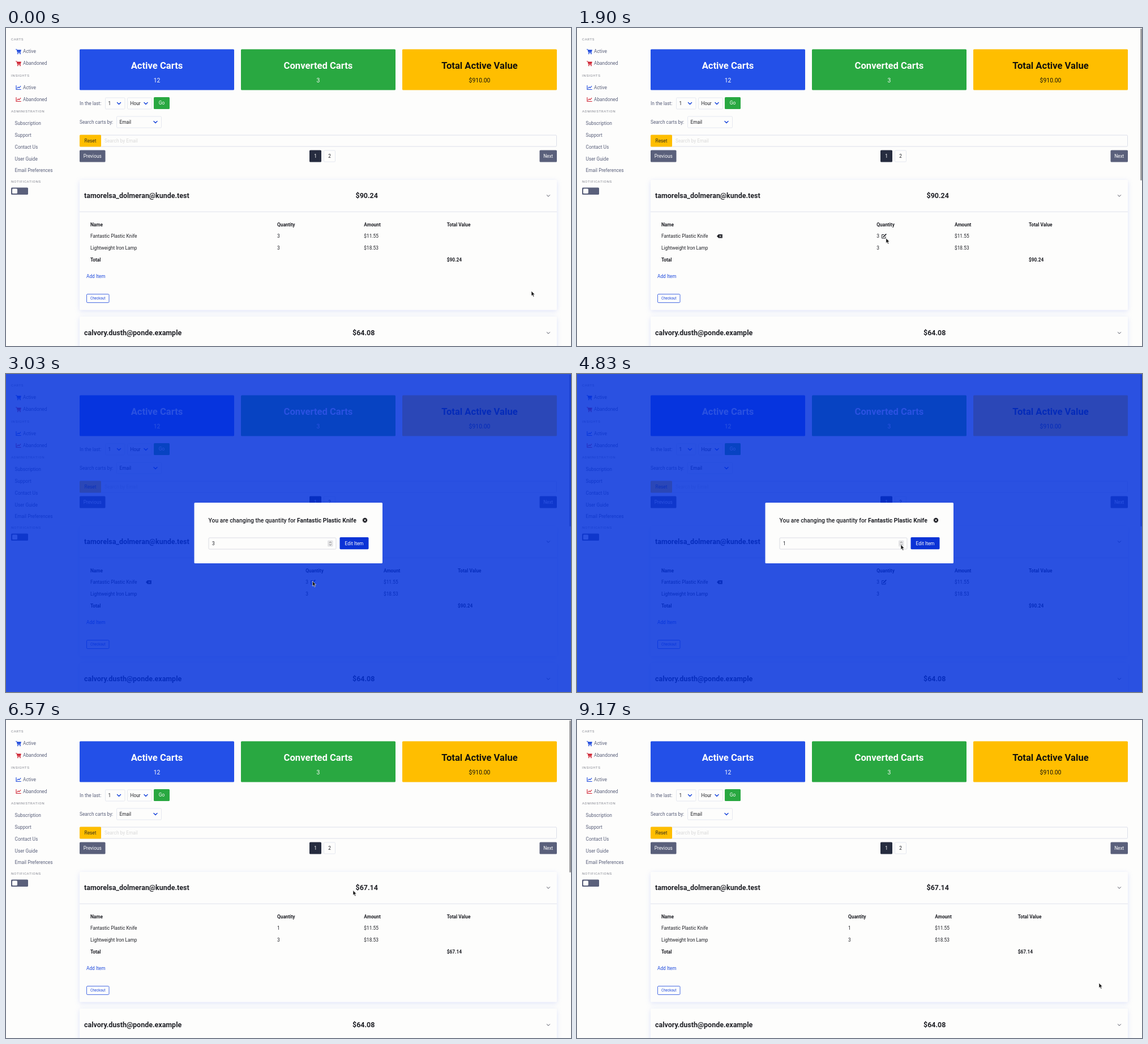
An HTML page for the animation above (9.24 s loop, 998 by 561 pixels).

```html
<!DOCTYPE html>
<html lang="en">
<head>
<meta charset="utf-8">
<title>Carts</title>
<style>
  html, body { margin: 0; width: 100%; height: 100%; overflow: hidden; background: #fdfdfc; }
  svg { display: block; width: 998px; height: 561px; font-family: Roboto, sans-serif; }
  text { white-space: pre; }
  .panel { filter: drop-shadow(0 2px 4px rgba(70, 100, 235, .17)); }
</style>
</head>
<body>
<svg id="stage" viewBox="0 0 998 561"></svg>
<script>
const LOOP = 9240, OPEN = 3030, CLOSE = 6570;
const INK = '#1f2026', SLATE = '#5a607b', BLUE = '#1d49dc', RED = '#cf2433', WHITE = '#fdfdfc';
const PAGE = '#fdfdfc', GREEN = '#29a841', GOLD = '#ffbe00', LINE = '#dfe2ec';

// x, vertical centre of the capitals, text, and options
const text = (x, y, s, { size = 8.32, fill = INK, w = 400, mid, id, gap = 0 } = {}) =>
  `<text x="${x}" y="${(y + size * .355).toFixed(2)}" font-size="${size}" fill="${fill}" font-weight="${w}"` +
  `${mid ? ' text-anchor="middle"' : ''}${id ? ` id="${id}"` : ''}${gap ? ` letter-spacing="${gap}"` : ''}>${s}</text>`;
const box = (x, y, w, h, fill, extra = '') =>
  `<rect x="${x}" y="${y}" width="${w}" height="${h}" rx="1.6" fill="${fill}" ${extra}/>`;
const stroke = (d, color, w = 1) =>
  `<path d="${d}" fill="none" stroke="${color}" stroke-width="${w}" stroke-linecap="round" stroke-linejoin="round"/>`;
const outline = (x, y, w, h, color = LINE) => box(x + .5, y + .5, w - 1, h - 1, PAGE, `stroke="${color}" stroke-width=".8"`);
const button = (x, y, w, h, fill, label, color = WHITE, size = 8.32) =>
  box(x, y, w, h, fill) + text(x + w / 2, y + h / 2, label, { fill: color, mid: true, size });
const chevron = (x, y, r, color, w) => stroke(`M${x - r} ${y - r / 2}l${r} ${r} ${r} ${-r}`, color, w);
const select = (x, y, w, label) =>
  outline(x, y, w, 21) + text(x + 5.5, y + 10.5, label) + chevron(x + w - 11, y + 10.5, 3, BLUE, 1.5);

const cart = (y, c) => `<g transform="translate(17 ${y - 4.5})">` + stroke('M.5 .8h1.6l1.4 5.7h5', c, 1) +
  `<path d="M2.5 1.5h7.4l-1.1 3.9h-5.4z" fill="${c}"/><circle cx="3.9" cy="8.3" r="1" fill="${c}"/><circle cx="8" cy="8.3" r="1" fill="${c}"/></g>`;
const chart = (y, c) => `<g transform="translate(17.5 ${y - 4})">` + stroke('M.5 .5v7h8.3', c, 1.1) +
  stroke('M2.2 5.2l2-2 1.5 1.4 2.6-3', c, 1.1) + '</g>';

function sidebar() {
  const heads = [[20, 'CARTS'], [84, 'INSIGHTS'], [147, 'ADMINISTRATION'], [271, 'NOTIFICATIONS']];
  const links = [[168.5, 'Subscription'], [189.5, 'Support'], [210, 'Contact Us'], [231, 'User Guide'], [251, 'Email Preferences']];
  const marked = [[41.5, cart, BLUE, 'Active'], [62.5, cart, RED, 'Abandoned'], [105, chart, BLUE, 'Active'], [126, chart, RED, 'Abandoned']];
  return heads.map(([y, s]) => text(9, y, s, { size: 6.24, fill: '#858791', gap: .62 })).join('') +
    marked.map(([y, icon, c, s]) => icon(y, c) + text(30, y, s, { fill: SLATE })).join('') +
    links.map(([y, s]) => text(15.5, y, s, { fill: SLATE })).join('') +
    box(9, 281.5, 30, 12.5, SLATE) + box(11, 283.5, 9, 8.5, WHITE);
}

function stats() {
  const cards = [[130, '#2350e8', WHITE, 'Active Carts', '12'], [415, GREEN, WHITE, 'Converted Carts', '3'],
    [700, GOLD, '#15130c', 'Total Active Value', '$910.00']];
  return cards.map(([x, bg, fg, title, n]) => box(x, 37.5, 273, 72, bg) +
    text(x + 136.5, 66, title, { size: 16.63, fill: fg, w: 700, mid: true }) +
    text(x + 136.5, 92.5, n, { size: 10.4, fill: fg, mid: true })).join('');
}

function filters() {
  return text(130, 133, 'In the last:', { fill: SLATE }) + select(175, 122.5, 35.5, '1') + select(214, 122.5, 44, 'Hour') +
    button(261, 122, 28, 21, GREEN, 'Go') +
    text(130, 166, 'Search carts by:', { fill: SLATE }) + select(195, 155.5, 80, 'Email') +
    outline(130, 188.5, 843, 21, '#d3d6e4') + button(130, 188.5, 38, 21, GOLD, 'Reset', '#35301c') +
    text(174, 199, 'Search by Email', { fill: '#d9d9d9' }) +
    button(130, 215.5, 45.5, 21, SLATE, 'Previous') + button(536, 215.5, 21, 21, '#262c3f', '1') +
    outline(561, 215.5, 21, 21) + text(571.5, 226, '2', { mid: true }) + button(942.5, 215.5, 30.5, 21, SLATE, 'Next');
}

const email = (y, s) => text(138, y, s, { size: 12.47, w: 700 }) + chevron(958, y, 2.6, '#4b4e5c', 1);

function carts() {
  const b = { w: 700 };
  const row = (y, name, price, i) => text(149, y, name) + `<g class="q">${text(0, y, '3', { id: 'qty' + i })}</g>` +
    `<g class="a">${text(0, y, price)}</g>`;
  return `<g class="panel">${box(130, 268, 843, 229.5, PAGE)}${box(130, 509, 843, 80, PAGE)}</g>` +
    `<path d="M130 324.2H973" stroke="${LINE}"/>` +
    email(296, 'tamorelsa_dolmeran@kunde.test') + text(617.5, 296, '$90.24', { size: 12.47, w: 700, id: 'sum' }) +
    text(149, 347, 'Name', b) + `<g class="q">${text(0, 347, 'Quantity', b)}</g><g class="a">${text(0, 347, 'Amount', b)}</g>` +
    `<g class="v">${text(0, 347, 'Total Value', b)}${text(0, 409, '$90.24', { w: 700, id: 'total' })}</g>` +
    row(367.5, 'Fantastic Plastic Knife', '$11.55', 1) + row(388.5, 'Lightweight Iron Lamp', '$18.53', 2) +
    text(149, 409, 'Total', b) + text(142, 438, 'Add Item', { fill: BLUE }) +
    outline(142, 469, 40.5, 16, BLUE) + text(162.3, 477, 'Checkout', { size: 6.3, fill: BLUE, mid: true }) +
    '<g id="tools">' +
      `<path d="M247 367.3l3-3.2h6.8v6.4h-6.8z" fill="${INK}"/>` + stroke('M251.7 365.9l2.8 2.8m0-2.8l-2.8 2.8', WHITE, .9) +
      stroke('M542 364.5h-3.4v6.4h6.4v-2.8', INK, 1) + stroke('M541.3 368.3l4.5-4.5', INK, 1.7) +
    '</g>' +
    email(538, 'calvory.dusth@ponde.example') + text(612, 538, '$64.08', { size: 12.47, w: 700 });
}

function modal() {
  return '<g id="modal"><rect width="998" height="561" fill="rgba(0,48,220,.83)"/>' + box(332.5, 227, 332.5, 107, PAGE) +
    text(357.5, 258, 'You are changing the quantity for <tspan font-weight="700">Fantastic Plastic Knife</tspan>', { size: 10.4, w: 500 }) +
    `<circle cx="634" cy="258" r="4.2" fill="${INK}"/>` + stroke('M632.5 256.5l3 3m0-3l-3 3', WHITE, 1) +
    outline(357.5, 288.5, 226, 21, '#d2d4dc') + text(364, 299, '3', { id: 'value' }) +
    box(568, 293.5, 9.5, 11, '#e4e4e6') + stroke('M571.2 297.6l1.6-1.6 1.6 1.6m-3.2 3l1.6 1.6 1.6-1.6', '#686868', .8) +
    box(589.5, 288, 51, 21.2, '#0b33d6', 'id="edit"') + text(615, 299, 'Edit Item', { fill: WHITE, mid: true }) + '</g>';
}

const stage = document.getElementById('stage');
stage.innerHTML = `<rect width="998" height="561" fill="${PAGE}"/>` + sidebar() + stats() + filters() + carts() +
  '<rect id="bar" x="995.5" y="1" width="2" height="268" rx="1" fill="#77777a"/>' + modal() +
  '<path id="cursor" d="M0 0v8.6l1.9-1.7 1.5 3.3 1.5-.7-1.5-3.2h2.7z" fill="#151515" stroke="#fff" stroke-width=".6"/>';

const el = id => document.getElementById(id);
const show = (id, on) => el(id).setAttribute('opacity', +on);
const shift = (cls, x) => stage.querySelectorAll('.' + cls).forEach(g => g.setAttribute('transform', `translate(${x})`));

// Pointer stops: time, x, y
const path = [[0, 928, 464], [990, 928, 464], [1730, 546, 371], [1870, 546, 371], [2150, 541.5, 365.5], [3200, 541.5, 365.5],
  [3900, 571, 297], [4300, 571, 297], [4480, 572, 301], [5530, 572, 301], [6130, 613, 300.5], [7290, 613, 300.5],
  [8150, 922, 464], [LOOP, 922, 464]];

function pointer(t) {
  const i = path.findIndex(p => p[0] > t);
  const [t0, x0, y0] = path[i - 1], [t1, x1, y1] = path[i];
  const u = (t - t0) / (t1 - t0), k = u * u * (3 - 2 * u);
  return [x0 + (x1 - x0) * k, y0 + (y1 - y0) * k];
}

const ramp = (t, from, to) => Math.min(1, Math.max(0, (t - from) / (to - from)));

function draw(t) {
  const [x, y] = pointer(t);
  const open = t >= OPEN && t < CLOSE, saved = t >= CLOSE;
  const row = open ? 1 : y >= 357 && y < 378 ? 1 : y >= 378 && y < 399 ? 2 : 0;

  shift('q', row ? 529.3 : 479);
  shift('a', row ? 667 : 632.3);
  shift('v', row ? 798 : 778.8);
  show('tools', row > 0);
  el('tools').setAttribute('transform', `translate(0 ${row === 2 ? 21 : 0})`);

  el('qty1').textContent = saved ? 1 : 3;
  el('sum').textContent = el('total').textContent = saved ? '$67.14' : '$90.24';
  el('value').textContent = t < 4560 ? 3 : t < 4800 ? 2 : 1;

  show('modal', open);
  el('edit').setAttribute('fill', x > 589 ? '#0a2cc4' : '#0b33d6');
  el('edit').setAttribute('stroke', t >= 6330 ? '#7f95ee' : 'none');
  show('bar', ramp(t, 1000, 1100) * (1 - ramp(t, 8000, 8170)));
  el('cursor').setAttribute('transform', `translate(${x.toFixed(2)} ${y.toFixed(2)})`);
}

function tick() {
  draw(performance.now() % LOOP);
  requestAnimationFrame(tick);
}
tick();
</script>
</body>
</html>
```
